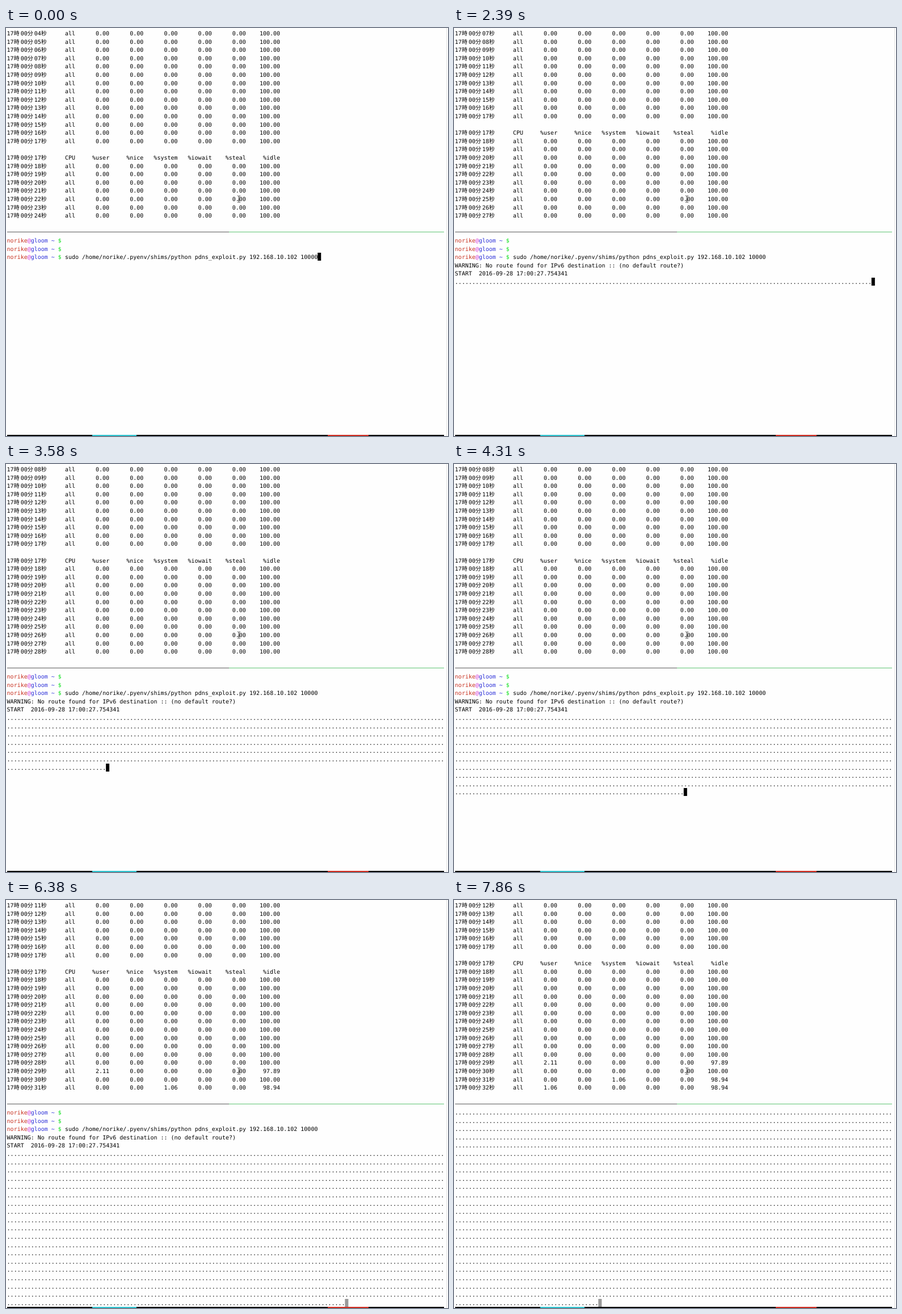
Write an HTML page that moves like this. It is 779 px wide and 719 px high and loops after 8 s.

```html
<!DOCTYPE html>
<html lang="ja">
<head>
<meta charset="utf-8">
<title>Terminal</title>
<style>
  html, body { margin: 0; width: 100%; height: 100%; overflow: hidden; background: #fefefe; }
  svg { display: block; width: 779px; height: 719px; }
  text {
    font: 10px "DejaVu Sans Mono", "Noto Sans CJK JP", "Noto Sans CJK", monospace;
    white-space: pre; text-rendering: geometricPrecision; fill: #000;
  }
  .user { fill: #c8301f; }
  .at { fill: #d23ad6; }
  .host { fill: #2b2fd8; }
  .sign { fill: #4fe85a; font-weight: bold; }
</style>
</head>
<body>
<svg viewBox="0 0 779 719">
  <path d="M776.5 0V719" stroke="#e3e3e3"/>
  <g id="stats"></g>
  <path d="M2 359.5H393" stroke="#5a5a5a"/>
  <path d="M393 359.5H772" stroke="#5fc473"/>
  <rect id="cursor" width="6" height="14"/>
  <g id="shell"></g>
  <path d="M2 718H772" stroke="#000" stroke-width="2"/>
  <path d="M152 718H230" stroke="#2cc3cf" stroke-width="2"/>
  <path d="M567 718H639" stroke="#cf2a1e" stroke-width="2"/>
  <path d="M408 295.5q2.5 0 2.5 2v8q0 2 -2.5 2M413 295.5q-2.5 0 -2.5 2v8q0 2 2.5 2M409 303.5h3"
        fill="none" stroke="#333" stroke-width=".9"/>
</svg>
<script>
const LOOP = 8000, RUN = 2090, STEP = 147.7;
const CELL = 6.018, COLS = 128, PITCH = 14.6;
const STAT_ROWS = 23, SHELL_TOP = 25, SHELL_ROWS = 24;
const USER = "norike", HOST = "gloom";

// step at which each further second is printed, from 27 on
const TICKS = [2, 9, 16, 23, 29, 36];
// [step, dots printed so far]
const DOTS = [[0.55, 0], [6, 460], [15, 1219], [22, 1804], [29, 2403], [39, 3242]];
// seconds with load: column and value
const LOAD = { 29: [0, 2.11], 31: [2, 1.06], 32: [0, 1.06] };

const $ = id => document.getElementById(id);
const colX = c => (1.6 + c * CELL).toFixed(2);
const rowY = r => Math.round(2 + r * PITCH);
const span = (col, s, cls = "") => `<tspan x="${colX(col)}" class="${cls}">${s}</tspan>`;
const line = (row, body) => `<text y="${rowY(row) + 11}">${body}</text>`;
const two = n => String(n).padStart(2, "0");

function statLine(sec, cells) {
  const clock = span(0, "17") + span(2, "時") + span(4, "00") +
    span(6, "分") + span(8, two(sec)) + span(10, "秒");
  return clock + cells.map((s, i) => span(i ? 20 + 10 * i - s.length : 17, s)).join("");
}

function sample(sec) {
  const use = [0, 0, 0, 0, 0];
  if (LOAD[sec]) use[LOAD[sec][0]] = LOAD[sec][1];
  const idle = 100 - use.reduce((a, b) => a + b);
  return statLine(sec, ["all", ...[...use, idle].map(v => v.toFixed(2))]);
}

function drawStats(last) {
  const rows = [];
  for (let s = 4; s <= last; s++) {
    rows.push(sample(s));
    if (s === 17) {
      rows.push("", statLine(s, ["CPU", "%user", "%nice", "%system", "%iowait", "%steal", "%idle"]));
    }
  }
  $("stats").innerHTML = rows.slice(-STAT_ROWS).map((b, i) => line(i, b)).join("");
}

function dotCount(step) {
  if (step < DOTS[0][0]) return 0;
  let i = 1;
  while (i < DOTS.length - 1 && step > DOTS[i][0]) i++;
  const [a, m] = DOTS[i - 1], [b, n] = DOTS[i];
  return Math.round(m + (n - m) * (step - a) / (b - a));
}

const prompt = span(0, USER, "user") + span(6, "@", "at") +
  span(7, HOST + " ~", "host") + span(15, "$", "sign");
const command = `sudo /home/${USER}/.pyenv/shims/python pdns_exploit.py 192.168.10.102 10000`;

function drawShell(step) {
  const rows = [prompt, prompt, prompt + span(17, command)];
  let col = 17 + command.length;
  if (step >= 0) {
    col = 0;
    if (step === 0) rows.push("");
  }
  if (step > 0) {
    rows.push(span(0, "WARNING: No route found for IPv6 destination :: (no default route?)"),
      span(0, "START  2016-09-28 17:00:27.754341"));
    const n = dotCount(step);
    for (let i = 0; i < Math.floor(n / COLS); i++) rows.push(span(0, ".".repeat(COLS)));
    col = n % COLS;
    rows.push(span(0, ".".repeat(col)));
  }
  const view = rows.slice(-SHELL_ROWS);
  $("shell").innerHTML = view.map((b, i) => line(SHELL_TOP + i, b)).join("");
  const cur = $("cursor");
  cur.setAttribute("x", colX(col));
  cur.setAttribute("y", rowY(SHELL_TOP + view.length - 1));
  cur.setAttribute("fill", view.length === SHELL_ROWS ? "#999" : "#000");
}

let shown = "";
function render(t) {
  const step = t < RUN ? -1 : Math.min(39, Math.floor((t - RUN) / STEP));
  const last = t < 450 ? 24 : t < 1490 ? 25 : 26 + TICKS.filter(k => step >= k).length;
  const key = step + ":" + last;
  if (key === shown) return;
  shown = key;
  drawStats(last);
  drawShell(step);
}

const start = performance.now();
function tick() {
  render((performance.now() - start) % LOOP);
  requestAnimationFrame(tick);
}
tick();
</script>
</body>
</html>
```
